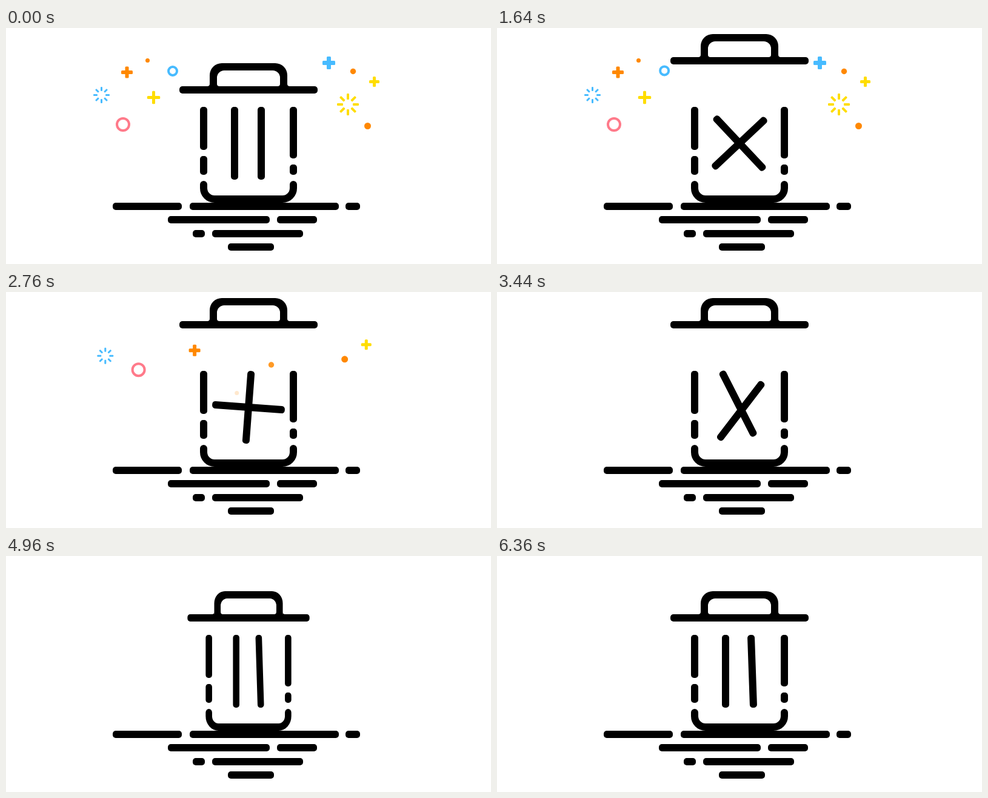
Recreate the animation shown at these times as an HTML page with a canvas. Size 800 px wide and 389 px high, loop 7200 ms.

```html
<!DOCTYPE html>
<html lang="en">
<head>
<meta charset="utf-8">
<title>Trash can</title>
<style>
  html, body { margin: 0; height: 100%; overflow: hidden; background: #fff; }
  canvas { display: block; }
</style>
</head>
<body>
<canvas id="stage" width="800" height="389"></canvas>
<script>
const ctx = document.getElementById('stage').getContext('2d');
const LOOP = 7200, RAD = Math.PI / 180;
const BLUE = '#47bbff', ORANGE = '#ff8800', YELLOW = '#ffdd00', PINK = '#ff7a8a';
const MOUTH = [400, 190];

const clamp = v => Math.min(1, Math.max(0, v));
const span = (t, from, to) => clamp((t - from) / (to - from));
const smooth = p => p * p * (3 - 2 * p);
const ease = (t, from, to) => smooth(span(t, from, to));

function box(x, y, w, h, r = 5) {
  ctx.beginPath();
  ctx.roundRect(x, y, w, h, r);
  ctx.fill();
}

function isolated(draw) {
  ctx.save();
  draw();
  ctx.restore();
}

// Particle shapes, drawn around the origin
const dot = r => () => {
  ctx.beginPath();
  ctx.arc(0, 0, r, 0, 7);
  ctx.fill();
};
const ring = r => () => {
  ctx.lineWidth = 4;
  ctx.beginPath();
  ctx.arc(0, 0, r, 0, 7);
  ctx.stroke();
};
const plus = (half, w) => () => {
  box(-half, -w / 2, 2 * half, w, 1.5);
  box(-w / 2, -half, w, 2 * half, 1.5);
};
const burst = (inner, outer, w) => () => {
  for (let i = 0; i < 8; i++) {
    box(inner, -w / 2, outer - inner, w, 1.2);
    ctx.rotate(Math.PI / 4);
  }
};

// shape, colour, rest position, control point of the flight, start time, duration
const particles = [
  [ring(7), BLUE, [275, 71], [350, 30], 1600, 800],
  [plus(10.7, 5), YELLOW, [243.5, 114.5], [320, 50], 1720, 800],
  [plus(10.5, 7), BLUE, [532.5, 57.5], [460, 30], 1840, 800],
  [burst(8, 18, 4), YELLOW, [564, 126], [480, 30], 1980, 800],
  [dot(3.5), ORANGE, [233.5, 53.5], [300, 65], 2116, 800],
  [dot(4.7), ORANGE, [572.5, 71.5], [470, 25], 2224, 800],
  [plus(9.5, 6), ORANGE, [199.5, 73], [290, 40], 2318, 800],
  [dot(5.5), ORANGE, [596.5, 161.5], [542, 31], 2340, 1200],
  [ring(10), PINK, [193, 159], [270, 40], 2560, 800],
  [plus(8.5, 5), YELLOW, [607.5, 88.5], [500, 70], 2640, 800],
  [burst(6.5, 13.5, 3), BLUE, [157.5, 110.5], [235, 40], 2665, 800]
];

function drawParticle(t, [shape, color, rest, bend, start, duration]) {
  const p = span(t, start, start + duration);
  const alpha = 1 - span(p, 0.64, 0.847);
  if (!alpha) return;
  const u = smooth(p), v = 1 - u;
  const at = i => v * v * rest[i] + 2 * u * v * bend[i] + u * u * MOUTH[i];
  isolated(() => {
    ctx.globalAlpha = alpha;
    ctx.fillStyle = ctx.strokeStyle = color;
    ctx.translate(at(0), at(1));
    shape();
  });
}

function drawGround() {
  const rows = [
    [288, 176, 290, 303, 549, 560, 584],
    [310, 267, 435, 447, 513],
    [333, 308, 328, 340, 490],
    [355, 366, 442]
  ];
  for (const [y, ...ends] of rows)
    for (let i = 0; i < ends.length; i += 2) box(ends[i], y, ends[i + 1] - ends[i], 12);
}

function drawLid(t) {
  const lift = 48 * (ease(t, 400, 800) - ease(t, 4040, 4400));
  isolated(() => {
    ctx.translate(0, -lift);
    box(286, 96, 228, 12);
    ctx.beginPath();
    ctx.roundRect(336, 58, 128, 40, [20, 20, 0, 0]);
    ctx.roundRect(348, 70, 104, 26, [12, 12, 4, 4]);
    ctx.fill('evenodd');
    // small flares where the handle meets the lid
    ctx.fill(new Path2D('M336 92Q336 96 332 96H336ZM464 92Q464 96 468 96H464Z'));
  });
}

function drawShell() {
  box(320, 130, 12, 71);
  box(320, 211, 12, 31);
  box(468, 130, 12, 85);
  box(468, 225, 12, 17);
  ctx.lineWidth = 12;
  ctx.lineCap = 'round';
  ctx.stroke(new Path2D('M326 258V264A18 18 0 0 0 344 282H456A18 18 0 0 0 474 264V258'));
}

// The two bars cross into a blade, spin, then swing back apart
function drawBar(t, side, gap, endTilt, closePower) {
  const open = ease(t, 600, 1200);
  const close = ease(t, 3200, 4000), rest = 1 - close;
  const spin = 720 * ease(t, 1596, 3196);
  let x = gap * (1 - open), y = 0, tilt = 45 * side * open;
  if (close) {
    const early = 3 * close * rest * rest;
    x = gap * (3 * close * close * rest + close ** 3) - early;
    y = 15 * early;
    tilt += (endTilt - tilt) * close ** closePower;
  }
  isolated(() => {
    ctx.translate(MOUTH[0] + side * x, MOUTH[1] + side * y);
    ctx.rotate((tilt + spin) * RAD);
    box(-6, -60, 12, 120);
  });
}

function poseCan(t) {
  const chew = span(t, 4800, 5680) * 2;
  const squeeze = smooth(1 - Math.abs(1 - 2 * (chew % 1)));
  const left = ease(t, 5800, 5960), right = ease(t, 5960, 6200), back = ease(t, 6200, 6360);
  const rock = -18 * left + 34.6 * right - 16.6 * back;
  const pivot = 400 + 35 * Math.sign(rock);
  ctx.translate(pivot, 288);
  ctx.rotate(rock * RAD);
  ctx.translate(400 - pivot, 0);
  ctx.scale(1 - 0.142 * squeeze, 1);
  ctx.translate(-400, -288);
}

function frame() {
  const t = performance.now() % LOOP;
  ctx.fillStyle = '#fff';
  ctx.fillRect(0, 0, 800, 389);
  ctx.fillStyle = ctx.strokeStyle = '#000';
  drawGround();
  isolated(() => {
    poseCan(t);
    drawShell();
    drawLid(t);
    drawBar(t, -1, 23, 0, 0.6);
    drawBar(t, 1, 21, -2, 1.2);
  });
  particles.forEach(p => drawParticle(t, p));
  requestAnimationFrame(frame);
}
frame();
</script>
</body>
</html>
```
